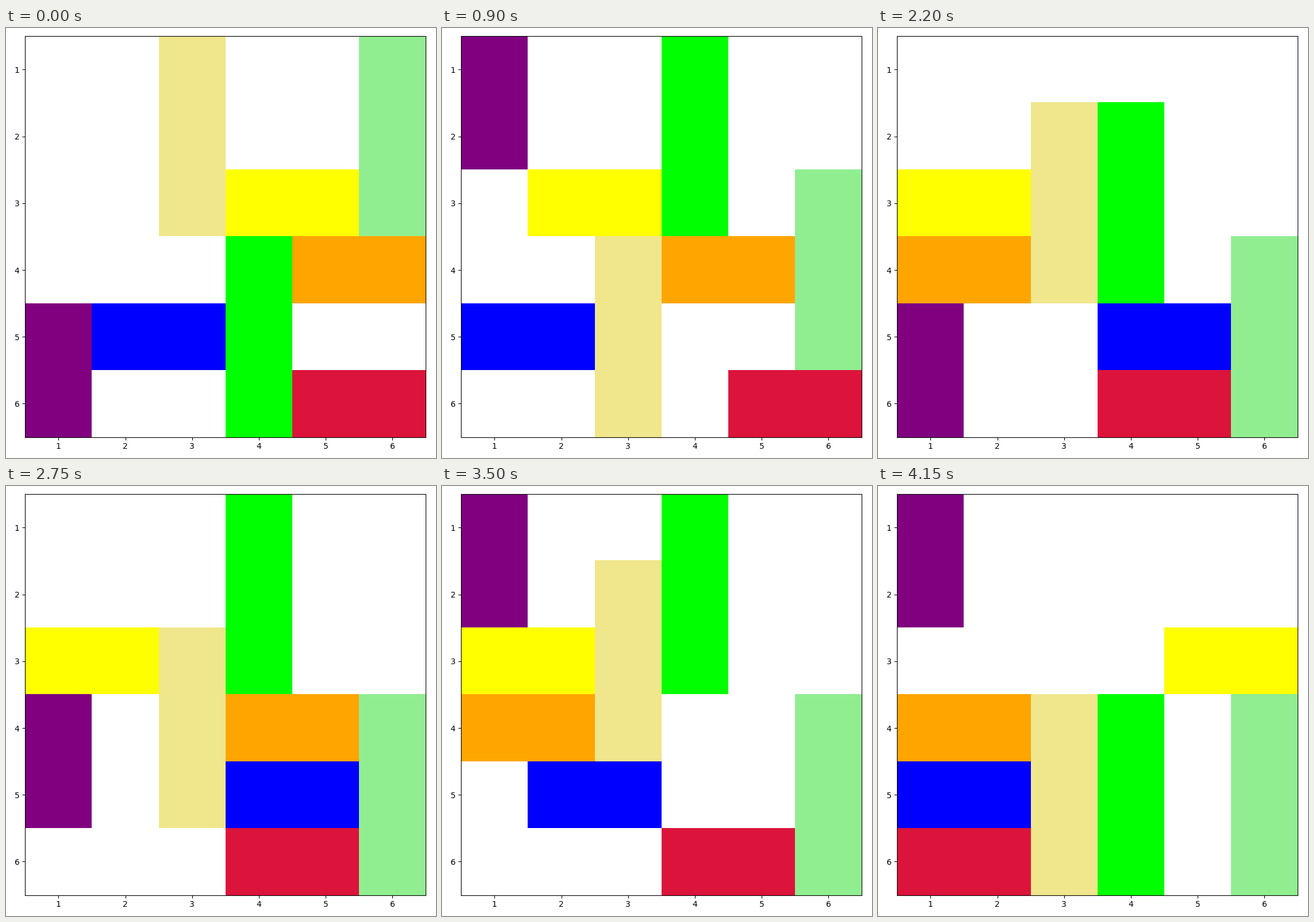
Animation of 748 by 748 pixels, one loop 4200 ms. Source, as a matplotlib script:

```python
import matplotlib.pyplot as plt
from matplotlib.animation import FuncAnimation
from matplotlib.patches import Rectangle

SIZE, DPI, INTERVAL = 748, 100, 50

# Pixel edges of the six columns and rows
X_EDGES = [33, 149, 266, 382, 498, 614, 730]
Y_EDGES = [14, 129, 246, 362, 479, 595, 712]

# name: (colour, orientation, lane, length, first cell), counted from 1
CARS = {
    "P": ("purple", "v", 1, 2, 5),
    "K": ("khaki", "v", 3, 3, 1),
    "L": ("lime", "v", 4, 3, 4),
    "G": ("lightgreen", "v", 6, 3, 1),
    "Y": ("yellow", "h", 3, 2, 4),
    "O": ("orange", "h", 4, 2, 5),
    "B": ("blue", "h", 5, 2, 2),
    "R": ("crimson", "h", 6, 2, 5),
}

# Each move is a car and a signed number of cells, one cell per frame;
# "." holds the board still.
MOVES = """
K+1 .+2 P-4 B-1 K+2 Y-2 L-3 O-1 G+2
R-1 G+1 Y-1 K-2 B+3 K+2 Y+1 P+1 .+1
P+3 Y-1 K-3 O-3 K+1 .+1 L+1 .+3
L-1 K-1 O+3 P-1 K+3
Y+1 P-3 Y-1 K-3 O-3 K+1 B-3 R-3 K+2 L+3 Y+4
"""


def build_states():
    state = {name: car[4] for name, car in CARS.items()}
    states = [dict(state)]
    for move in MOVES.split():
        name, cells = move[0], int(move[1:])
        for _ in range(abs(cells)):
            if name in state:
                state[name] += 1 if cells > 0 else -1
            states.append(dict(state))
    return states


def car_bounds(name, start):
    """Return x, y, width and height of a car in pixels."""
    _, way, lane, length, _ = CARS[name]
    along, across = (X_EDGES, Y_EDGES) if way == "h" else (Y_EDGES, X_EDGES)
    a0, a1 = along[start - 1], along[start - 1 + length]
    b0, b1 = across[lane - 1], across[lane]
    if way == "h":
        return a0, b0, a1 - a0, b1 - b0
    return b0, a0, b1 - b0, a1 - a0


fig = plt.figure(figsize=(SIZE / DPI, SIZE / DPI), dpi=DPI, facecolor="white")

# Board layer in pixel units
board = fig.add_axes([0, 0, 1, 1], zorder=0)
board.set(xlim=(0, SIZE), ylim=(SIZE, 0))
board.axis("off")

# Frame with ticks on top
left, top, side = 33.25, 14.35, 697.2
frame = fig.add_axes(
    [left / SIZE, 1 - (top + side) / SIZE, side / SIZE, side / SIZE],
    zorder=1, facecolor="none")
frame.set(xlim=(0.5, 6.5), ylim=(6.5, 0.5),
          xticks=range(1, 7), yticks=range(1, 7))

STATES = build_states()
rects = {}
for name, car in CARS.items():
    rects[name] = board.add_patch(
        Rectangle((0, 0), 1, 1, facecolor=car[0], linewidth=0,
                  antialiased=False))


def update(i):
    for name, start in STATES[i].items():
        rects[name].set_bounds(*car_bounds(name, start))
    return list(rects.values())


anim = FuncAnimation(fig, update, frames=len(STATES), interval=INTERVAL,
                     repeat=True, repeat_delay=0)
plt.show()
```
